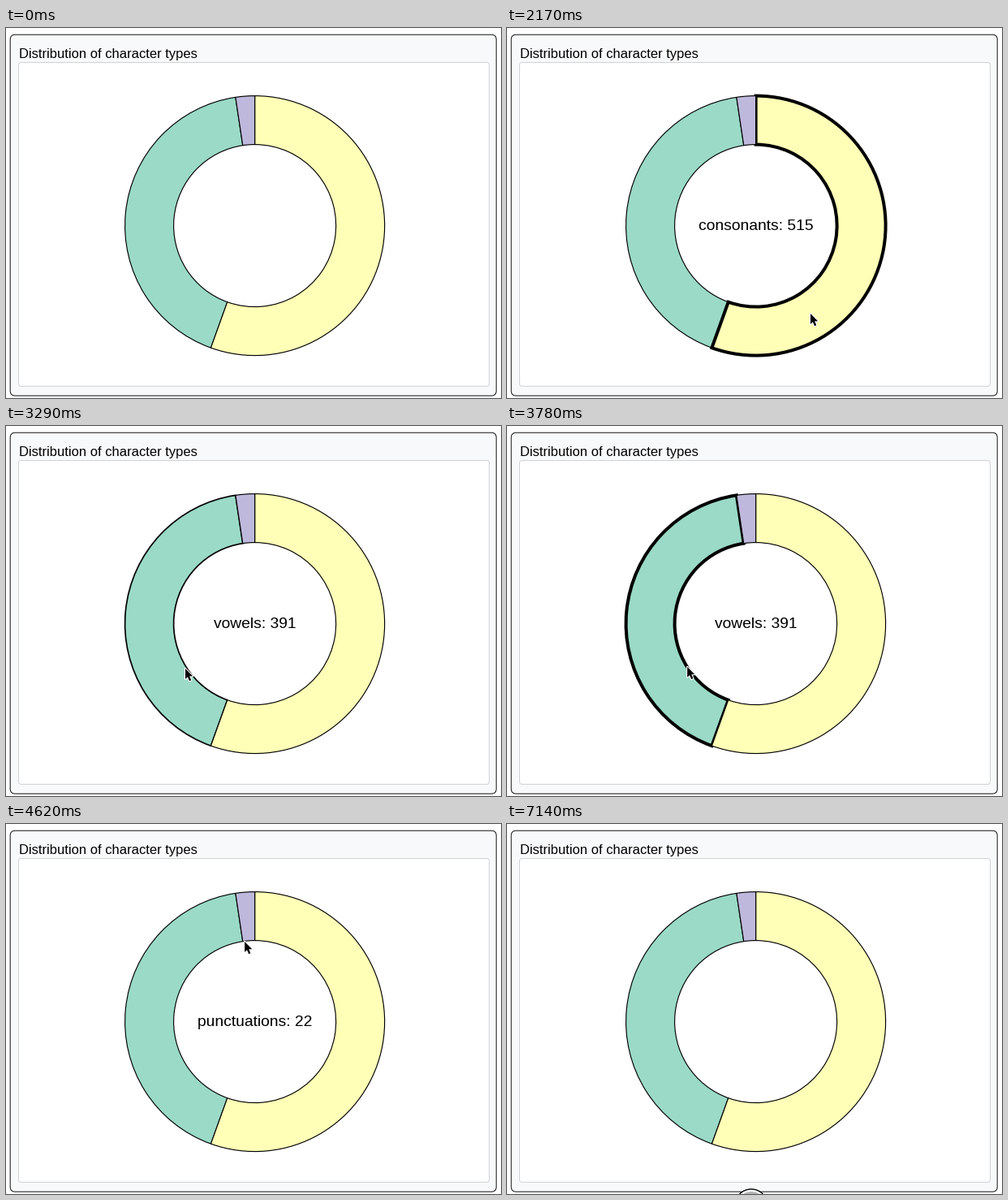
A matplotlib script for the animation above (7.21 s loop, 610 by 456 pixels).

```python
import numpy as np
import matplotlib.pyplot as plt
from matplotlib.animation import FuncAnimation
from matplotlib.patches import Circle, FancyBboxPatch, Polygon, Wedge

W, H, DPI = 610, 456, 64
PT = 72 / DPI                      # points per pixel
FRAMES, STEP = 103, 70
FADE = 250 / STEP                  # stroke transition, in frames
CENTER, R_OUT, R_IN = (306.6, 243.6), 160, 100
THIN, THICK = 1.15, 4

# label, count, colour, stacking; clockwise from the top
DATA = [("consonants", 515, "#ffffb7", 2),
        ("vowels", 391, "#9adac7", 1),
        ("punctuations", 22, "#beb8dc", 3)]

# (enter, leave, slice)
HOVERS = [(26.7, 36.7, 0), (45.7, 54.7, 1), (65.7, 80.7, 2), (87.7, 88.7, 0)]

# pointer stops, and the curved moves between them: start, end, bend
STOPS = np.array([(335, 450), (374, 352), (221, 299), (297, 134), (304, 385)])
MOVES = [(22, 31, (365, 385)), (35, 46, (232, 268)),
         (53, 70, (290, 170)), (79, 89, (297, 213))]

ARROW = 0.95 * np.array([(0, 0), (0, 13.6), (3, 10.8), (5.3, 16), (7.6, 15),
                         (5.4, 9.8), (9.6, 9.8)])


def cubic(t):
    t = min(max(t, 0), 1)
    return 4 * t**3 if t < 0.5 else 1 - 4 * (1 - t)**3


def stroke(i, n):
    grow = 0
    for start, end, k in HOVERS:
        if k == i:
            peak = cubic((min(n, end) - start) / FADE)
            grow += peak * (1 - cubic((n - end) / FADE))
    return THIN + (THICK - THIN) * grow


def label(n):
    for start, end, k in HOVERS:
        if start <= n < end:
            return f"{DATA[k][0]}: {DATA[k][1]}"
    return ""


def pointer(n):
    """Eased quadratic curve from stop to stop."""
    pos = STOPS[0]
    for a, b, (start, end, bend) in zip(STOPS, STOPS[1:], MOVES):
        if n >= start:
            u = min((n - start) / (end - start), 1)
            s = (1 - np.cos(np.pi * u)) / 2
            pos = (1 - s)**2 * a + 2 * s * (1 - s) * np.array(bend) + s**2 * b
    return pos


fig = plt.figure(figsize=(W / DPI, H / DPI), dpi=DPI, facecolor="white")
ax = fig.add_axes([0, 0, 1, 1])
ax.set(xlim=(0, W), ylim=(H, 0))
ax.axis("off")


def box(x0, y0, x1, y1, r, face, edge):
    ax.add_patch(FancyBboxPatch(
        (x0, y0), x1 - x0, y1 - y0, fc=face, ec=edge, lw=PT,
        boxstyle=f"round,pad=0,rounding_size={r}"))


def text(x, y, s, px, **kw):
    return ax.text(x, y, s, fontsize=px * PT, family="Liberation Sans",
                   color="black", va="baseline", **kw)


box(5.2, 8.2, 604.2, 453.2, 6, "#f8f9fa", "#111111")
box(15.5, 42.5, 595.5, 441.5, 3, "white", "#d0d3d6")
text(15.5, 36.5, "Distribution of character types", 16.5)

ends = np.cumsum([0] + [count for _, count, _, _ in DATA])
ends = ends / ends[-1] * 360 - 90
slices = [ax.add_patch(Wedge(CENTER, R_OUT, a, b, width=R_OUT - R_IN,
                             fc=color, ec="black", joinstyle="miter",
                             zorder=1 + level))
          for (_, _, color, level), a, b in zip(DATA, ends, ends[1:])]

caption = text(CENTER[0], 249, "", 19.2, ha="center", zorder=6)

halo = ax.add_patch(Polygon(ARROW, fc="white", ec="white", lw=2.2 * PT,
                            joinstyle="round", zorder=8))
arrow = ax.add_patch(Polygon(ARROW, fc="black", ec="none", zorder=9))

button = [ax.add_patch(Circle((301, 470), 20, fc="white", ec="black",
                              lw=1.4 * PT, zorder=10)),
          ax.add_patch(Circle((301, 470), 17, fc="#b4b4b4", ec="none",
                              zorder=11))]


def draw(n):
    for i, s in enumerate(slices):
        s.set_linewidth(stroke(i, n) * PT)
    caption.set_text(label(n))
    for p in (halo, arrow):
        p.set_xy(ARROW + pointer(n))
        p.set_visible(MOVES[0][0] <= n < MOVES[-1][1])
    for p in button:
        p.set_visible(n == FRAMES - 1)
    return [*slices, caption, halo, arrow, *button]


anim = FuncAnimation(fig, draw, frames=FRAMES, interval=STEP,
                     init_func=lambda: draw(0), repeat=True, repeat_delay=0)
plt.show()
```
